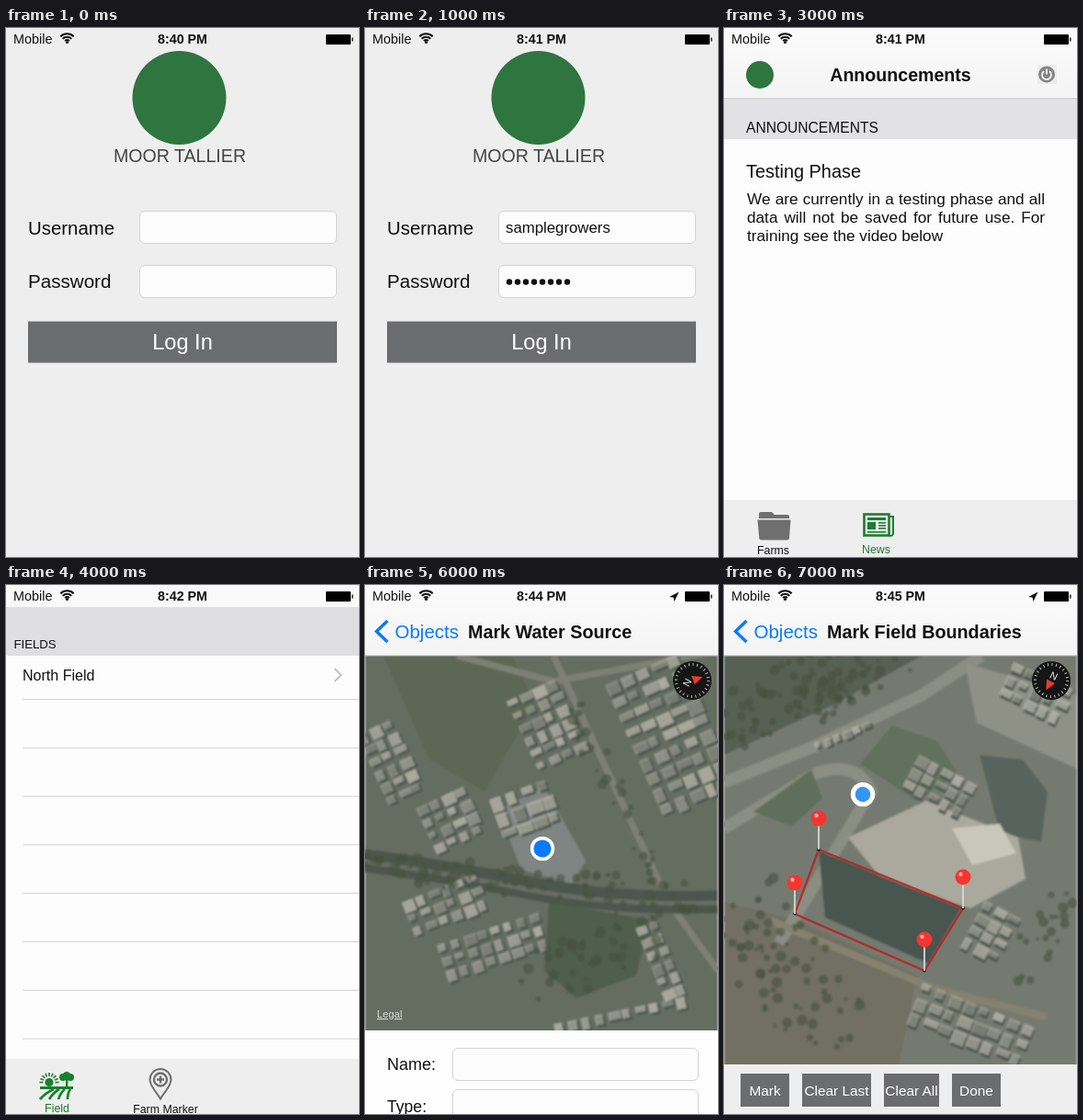
An HTML page that plays this animation: 384 px wide and 576 px high, repeating every 8000 ms.

```html
<!DOCTYPE html>
<html lang="en">
<head>
<meta charset="utf-8">
<title>Farm app tour</title>
<style>
html, body { margin: 0; width: 100%; height: 100%; overflow: hidden; background: #fdfdfd; }
svg { display: block; width: 100vw; height: 100vh; font-family: "Liberation Sans", Arial, sans-serif; }
.scene { visibility: hidden; animation: show 8s step-end infinite; }
@keyframes show {
  0% { visibility: visible; }
  12.5%, 100% { visibility: hidden; }
}
.note { font-size: 17.2px; line-height: 20px; text-align: justify; color: #111; }
</style>
</head>
<body>
<svg id="stage" viewBox="0 0 384 576"></svg>
<script>
const INK = '#111', GREEN = '#1a7f2e', GREY = '#6f6f6f', SLATE = '#6b6c6e', BLUE = '#0a7aff', BRAND = '#2f7540';
const MID = 'text-anchor="middle"', BOLD = 'font-weight="bold"';

const rect = (x, y, w, h, fill, extra = '') =>
  `<rect x="${x}" y="${y}" width="${w}" height="${h}" fill="${fill}" ${extra}/>`;
const circle = (x, y, r, fill, extra = '') => `<circle cx="${x}" cy="${y}" r="${r}" fill="${fill}" ${extra}/>`;
const poly = (points, fill, extra = '') => `<polygon points="${points}" fill="${fill}" ${extra}/>`;
const line = (d, stroke, width) => `<path d="${d}" fill="none" stroke="${stroke}" stroke-width="${width}"/>`;
const text = (x, y, size, str, fill = INK, extra = '') =>
  `<text x="${x}" y="${y}" font-size="${size}" fill="${fill}" ${extra}>${str}</text>`;
const turn = (x, y, angle, art) => `<g transform="translate(${x} ${y}) rotate(${angle})">${art}</g>`;
const times = (n, fn) => Array.from({ length: n }, (_, i) => fn(i)).join('');

function randomizer(seed) {
  return () => (seed = (seed * 16807) % 2147483647) / 2147483647;
}

// Shared interface parts
function wifi(x, y) {
  return circle(x, y, 1.6, INK) + times(3, i => {
    const k = 2.4 * (i + 1);
    return line(`M${x - k} ${y + 1 - k}A${k * 1.4} ${k * 1.4} 0 0 1 ${x + k} ${y + 1 - k}`, INK, 2);
  });
}

const status = (time, located = false) =>
  text(8, 17.3, 14.4, 'Mobile') + wifi(66.5, 15.5) + text(192, 17.3, 14.3, time, INK, `${MID} ${BOLD}`) +
  (located ? poly('331,13 341.5,7.5 336.5,18 335.5,13.5', INK) : '') +
  rect(348, 7, 27, 11, '#000', 'rx="1"') + rect(376, 10.5, 1.6, 4, '#333');

const navBar = () => rect(0, 0, 384, 77, 'url(#nav)') + rect(0, 76.5, 384, 1, '#b4b4b4');

const power = () => rect(341, 40, 21, 21, '#ededed') + circle(351, 50.5, 9, '#858585') +
  line('M348 47a5 5 0 1 0 6 0M351 44.5v6', '#fff', 1.6);

const homeNav = (title, time) => navBar() + status(time) + circle(39, 51, 15, BRAND) +
  text(192, 57.5, 19.6, title, INK, `${MID} ${BOLD}`) + power();

const backNav = (title, time) => navBar() + status(time, true) +
  line('M24.5 39L12.5 50.5L24.5 62', BLUE, 3.4) + text(32.5, 57.5, 20.5, 'Objects', BLUE) +
  text(112, 57.5, 19.75, title, INK, BOLD);

const input = (x, y, w) => rect(x + .5, y + .5, w, 35, '#fcfcfc', 'rx="5.5" stroke="#d4d4d4"');
const page = (color = '#fdfdfd') => rect(0, 0, 384, 576, color);

// Tab icons
const folder = c => `<path d="M38 534v-5q0-2 2-2h12l3 3h14q2 0 2 2v2z" fill="${c}"/>` +
  `<path d="M36.5 535.5h36l-1.5 20q-.2 2-2 2h-28.5q-2 0-2.2-2z" fill="${c}"/>`;

const newspaper = c => rect(152.5, 529.5, 27, 23, 'none', `stroke="${c}" stroke-width="2.6"`) +
  line('M181 532h3v18q0 3-4 3', c, 2) + rect(156, 533, 20, 3, c) + rect(156, 538, 9, 8, c) +
  times(3, i => rect(168, 538 + i * 3, 8, 1.6, c)) + rect(156, 548, 20, 1.6, c);

const fieldIcon = c => circle(47, 541.5, 4.5, c) +
  times(9, i => turn(47, 541.5, i * 22.5, rect(-10.5, -.8, 4, 1.6, c))) +
  times(3, i => circle(62 + i * 4, 536 - i % 2 * 2, 4, c)) + rect(65, 538, 2.4, 8, c) + rect(37, 546, 36, 3, c) +
  times(4, i => line(`M${52 + i * 6} 549Q${43 + i * 8} 553 ${37 + i * 10} 560`, c, 2.7));

const marker = c => line('M168 559.5C164 552 156.5 546 156.5 538.5a11.5 11.5 0 0 1 23 0C179.5 546 172 552 168 559.5z', c, 2) +
  circle(168, 538.5, 7, 'none', `stroke="${c}" stroke-width="2.4"`) + line('M164 538.5h8M168 534.5v8', c, 2.4);

function tabs(top, items, active) {
  return rect(0, top, 384, 576 - top, '#eeeeee') + items.map(([icon, label, x], i) => {
    const on = i === active;
    return icon(on ? GREEN : GREY) + text(x, top + (on ? 58 : 59), 12.35, label, on ? GREEN : INK, MID);
  }).join('');
}
const homeTabs = active => tabs(514, [[folder, 'Farms', 53.5], [newspaper, 'News', 165.5]], active);
const farmTabs = active => tabs(516, [[fieldIcon, 'Field', 55.5], [marker, 'Farm Marker', 173.5]], active);

// Screens
function login(time, user = '', secret = 0) {
  return page('#eeeeee') + status(time) + circle(188.5, 76, 51, BRAND) +
    text(189, 146, 19.6, 'MOOR TALLIER', '#454545', MID) +
    text(24, 225, 20.4, 'Username') + input(145, 199, 214) +
    text(24, 283, 20.6, 'Password') + input(145, 258, 214) +
    text(153, 223, 16.8, user) + times(secret, i => circle(157 + i * 9, 276.5, 3.2, INK)) +
    rect(24, 319.5, 336, 45, SLATE) + text(192, 350, 23.6, 'Log In', '#fff', MID);
}

function farms() {
  const names = ['a village farm', 'E&amp;K Lands', 'A_5-19-2015…', 'Farm Test Ri…', '', ''];
  const tiles = names.map((name, i) => {
    const x = 24 + (i % 2) * 180, y = 101 + Math.floor(i / 2) * 168;
    return rect(x, y, 156, 144, '#525453') + text(x + 17, y + 128, 19.4, name, '#fff');
  }).join('');
  return page() + tiles + homeNav('Farms', '8:41 PM') + homeTabs(0);
}

function news() {
  const body = 'We are currently in a testing phase and all data will not be saved for future use. For training see the video below';
  return page() + homeNav('Announcements', '8:41 PM') + rect(0, 77.5, 384, 43.5, '#e2e2e4') +
    text(24, 114, 15.6, 'ANNOUNCEMENTS') + text(24, 163, 19.9, 'Testing Phase') +
    `<foreignObject x="25" y="176" width="324" height="70"><div class="note">${body}</div></foreignObject>` +
    homeTabs(1);
}

function list(heading, rows, active) {
  return page() + rect(0, 0, 384, 24, '#f9f9f9') + rect(0, 24, 384, 53, '#dfdfe1') + status('8:42 PM') +
    text(8.5, 69, 13.2, heading) + times(8, i => rect(18, 124 + i * 52.8, 366, 1, '#d2d2d2')) +
    rows.map((row, i) => text(18, 104 + i * 53, 16.05, row) +
      line(`M357.5 ${91 + i * 53}l7 7l-7 7`, '#c2c2c6', 2)).join('') + farmTabs(active);
}

// Aerial views
function houses(x, y, cols, rows, angle, step = 15) {
  const rnd = randomizer(x * 997 + y);
  return turn(x, y, angle, times(cols * rows, i => {
    const hx = (i % cols - cols / 2) * step, hy = (Math.floor(i / cols) - rows / 2) * step;
    const w = step * (.5 + rnd() * .5), h = step * (.4 + rnd() * .5);
    return rect(hx + 2, hy + 3, w, h, '#4e5750') + rect(hx, hy, w, h, '#b4b3a7', `opacity="${.4 + rnd() * .5}"`);
  }));
}

function trees(count, x0, y0, x1, y1, spread) {
  const rnd = randomizer(count * 31 + x1);
  return times(count, () => {
    const k = rnd(), off = () => (rnd() - .5) * spread;
    return circle(x0 + (x1 - x0) * k + off(), y0 + (y1 - y0) * k + off(), 2 + rnd() * 4, '#46523f', 'opacity=".6"');
  });
}

const aerial = (bottom, art) =>
  `<svg y="77" width="384" height="${bottom - 77}" viewBox="0 77 384 ${bottom - 77}"><g filter="url(#soft)">${art}</g></svg>`;

// Heading and letter angle are in degrees; the letter sits behind the needle.
function compass(heading, letterAngle) {
  return circle(356, 104, 21, '#151515') +
    circle(356, 104, 17.5, 'none', 'stroke="#bbb" stroke-width="3" stroke-dasharray="1 3.58"') +
    turn(356, 104, heading, poly('12,0 1,-5 1,5', '#f0392b') +
      turn(-6, 0, letterAngle - heading, text(0, 4, 11, 'N', '#eee', MID)));
}

const here = (x, y, r, color) => circle(x, y, 14, '#0002') + circle(x, y, 13.3, '#fff') + circle(x, y, r, color);

function waterMap() {
  const art = rect(0, 70, 384, 420, '#656d61') +
    poly('20,77 160,77 185,130 130,225 70,190', '#5c6755') +
    poly('200,345 310,365 295,425 230,450 195,420', '#505e4b') +
    poly('145,245 195,220 240,300 225,325 170,310', '#7f8582') +
    line('M205 77L330 345L384 420M100 77L205 105L384 72', '#7e8074', 7) +
    line('M0 300Q90 312 180 330T384 345', '#4d574d', 25) + line('M0 301Q90 314 180 332T384 346', '#686d63', 5) +
    houses(200, 155, 4, 6, -25) + houses(30, 195, 3, 6, -25) + houses(95, 258, 4, 4, -25) +
    houses(178, 247, 4, 3, -20, 18) + houses(335, 165, 5, 9, -24, 18) +
    houses(90, 350, 6, 3, -22) + houses(142, 395, 8, 3, -18) + houses(325, 410, 2, 6, -22) + houses(280, 470, 10, 1, -12) +
    trees(90, 0, 305, 384, 345, 34) + trees(35, 225, 125, 320, 330, 24) + trees(45, 190, 430, 310, 370, 60);
  return page('#fefefe') + aerial(485, art) + backNav('Mark Water Source', '8:44 PM') +
    compass(-20, -62) + here(193, 287, 9.6, BLUE) +
    text(13, 471, 11.2, 'Legal', '#d6d9d3', 'text-decoration="underline"') +
    text(24, 528, 18, 'Name:') + input(95, 504, 267) + text(24, 574, 17.6, 'Type:') + input(95, 549, 267);
}

const pin = ([x, y]) => circle(x, y, 1.8, '#222') + line(`M${x} ${y}v-26`, '#d8d8d8', 1.8) +
  circle(x, y - 34, 8.5, '#f5352f') + circle(x - 2.5, y - 37, 2.2, '#ffaaa5');

function buttonRow(items) {
  let next = 18;
  return items.map(([label, width]) => {
    const x = next;
    next += width + 14;
    return rect(x, 532, width, 36, SLATE) + text(x + width / 2, 555.5, 15.4, label, '#fff', MID);
  }).join('');
}

function fieldMap() {
  const corners = [[103, 288], [260, 352], [218, 420], [77, 358]];
  const art = rect(0, 70, 384, 460, '#757a6f') +
    poly('0,77 215,77 120,130 0,185', '#576052') + poly('0,345 80,365 210,425 190,522 0,522', '#716f62') +
    line('M0 215L100 175L215 120L280 77M0 265L100 205Q145 190 160 225L60 390', '#8b8e82', 13) +
    poly('148,195 183,153 232,170 254,205 210,235', '#62705d') + poly('32,247 95,201 107,232 74,263', '#606e5b') +
    poly('262,85 384,120 384,200 275,150', '#8f9187') + poly('278,185 325,190 352,225 345,280 300,270', '#59635d') +
    poly('135,275 220,235 320,275 328,320 268,352 170,318', '#aaa99d') +
    poly('248,265 300,260 318,292 270,305', '#c9c7bb') +
    poly('103,289 258,352 222,412 110,362', '#4a5550') +
    line('M50 365L230 440L350 470', '#85826f', 8) +
    houses(130, 165, 6, 1, -22, 11) + houses(235, 222, 5, 3, 28) + houses(290, 380, 3, 4, 28) +
    houses(270, 482, 8, 3, 22, 17) + houses(340, 120, 5, 3, 25) +
    trees(110, 0, 145, 180, 85, 70) + trees(70, 10, 340, 110, 480, 90) + trees(25, 335, 420, 384, 310, 45);
  return page('#eeeeee') + aerial(522, art) + backNav('Mark Field Boundaries', '8:45 PM') +
    compass(118, 25) + here(151, 228, 8.3, '#3394fa') +
    poly(corners, 'none', 'stroke="#b92222" stroke-opacity=".85" stroke-width="2.4"') + corners.map(pin).join('') +
    buttonRow([['Mark', 53], ['Clear Last', 75], ['Clear All', 60], ['Done', 53]]);
}

const scenes = [
  login('8:40 PM'),
  login('8:41 PM', 'samplegrowers', 8),
  farms(),
  news(),
  list('FIELDS', ['North Field'], 0),
  list('OBJECT TYPE', ['Water Source', 'Field Boundaries'], 1),
  waterMap(),
  fieldMap()
];

const defs = '<defs><linearGradient id="nav" x2="0" y2="1"><stop stop-color="#fbfbfb"/><stop offset="1" stop-color="#f4f4f4"/></linearGradient>' +
  '<filter id="soft"><feGaussianBlur stdDeviation="1.1"/></filter></defs>';

document.getElementById('stage').innerHTML = defs + scenes.map((art, i) =>
  `<g class="scene" style="animation-delay:${i - scenes.length}s">${art}</g>`).join('');
</script>
</body>
</html>
```
